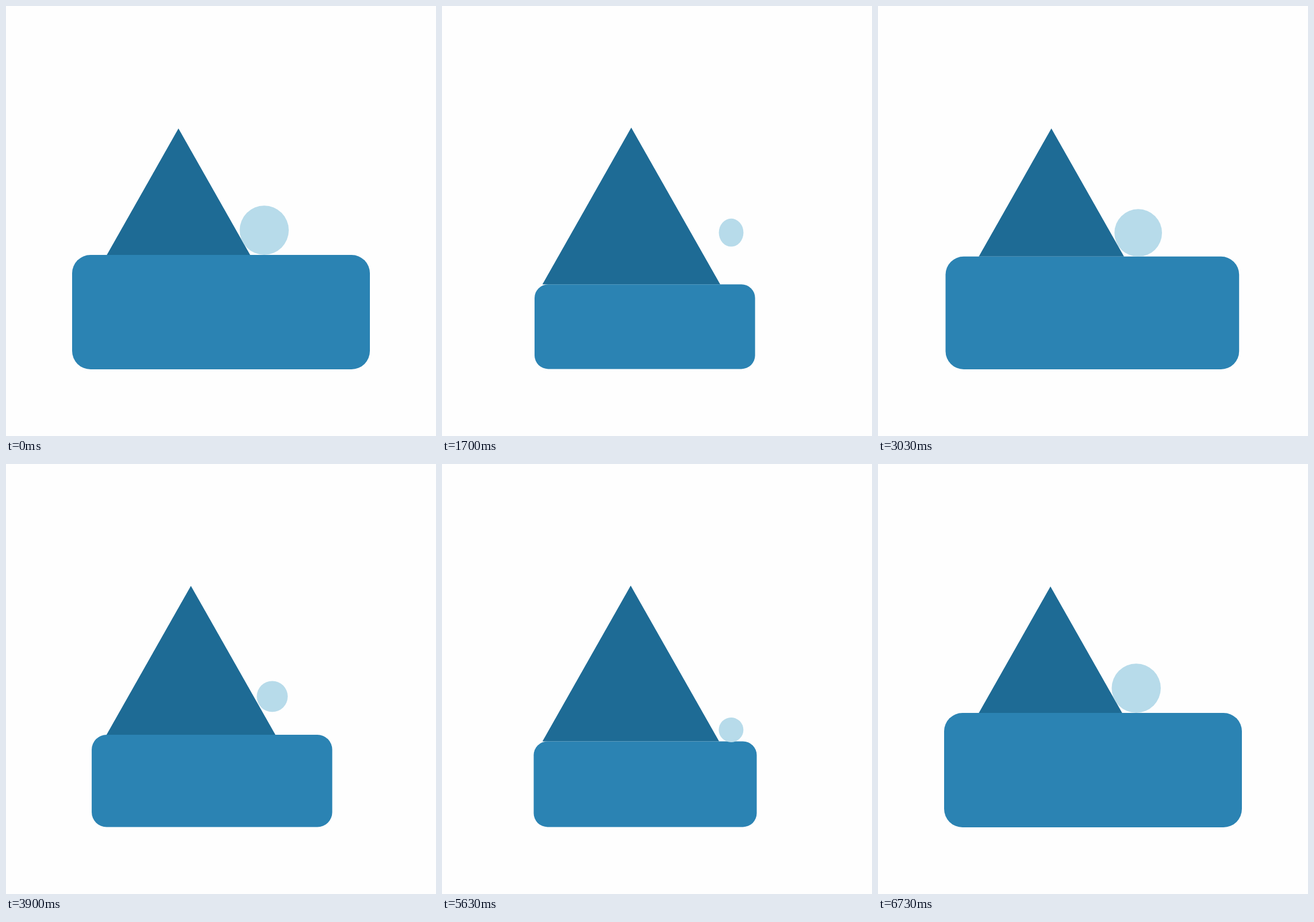
These frames come from a looping animation (748 by 748 pixels, 7.06 s). An HTML page:

```html
<!DOCTYPE html>
<html lang="en">
<head>
<meta charset="utf-8">
<title>Shapes</title>
<style>
  html, body { margin: 0; width: 100%; height: 100%; overflow: hidden; background: #fefefe; }
  svg { display: block; width: 100vw; height: 100vh; }
</style>
</head>
<body>
<svg viewBox="0 0 748 748">
  <path id="peak" fill="#1e6b95"/>
  <rect id="base" fill="#2b83b3"/>
  <ellipse id="ball" fill="#b7dbea"/>
</svg>
<script>
const LOOP = 7060, CYCLE = 3500;
const [peak, base, ball] = ['peak', 'base', 'ball'].map(id => document.getElementById(id));

const mix = (a, b, p) => a + (b - a) * p;
const ease = (t, from, to) => {
  const x = Math.min(1, Math.max(0, (t - from) / (to - from)));
  return x * x * (3 - 2 * x);
};
const set = (el, attrs) => {
  for (const name in attrs) el.setAttribute(name, attrs[name]);
};

// Two hops of equal length while the other shapes rest.
function hop(t) {
  if (t < 800 || t > 2000) return 0;
  const u = ((t - 800) % 600) / 600;
  return 4 * u * (1 - u);
}

function draw(t) {
  const p = ease(t, 0, 600) - ease(t, 2000, 3200);
  const top = mix(433, 484.2, p);
  const left = mix(115, 161, p);

  set(base, {
    x: left, y: top,
    width: mix(633, 544.6, p) - left,
    height: mix(632, 631.4, p) - top,
    rx: mix(32, 23.7, p)
  });

  const apex = `${mix(300, 329.2, p)} ${mix(213, 211.5, p)}`;
  set(peak, { d: `M${apex}L${mix(424.7, 484, p)} ${top}H${mix(175.4, 174.7, p)}Z` });

  // The ball shrinks with the base but travels later, sagging slightly on the way out.
  const back = ease(t, 2100, 3200);
  const out = ease(t, 200, 800);
  const r = mix(42.7, 21.4, ease(t, 0, 600) - back);
  const h = hop(t);
  set(ball, {
    cx: mix(449.2, 503, out - back),
    cy: mix(390, 462.6, Math.pow(out, 1.2) - back) - 68.4 * h,
    rx: r,
    ry: r * (1 + 0.14 * h)
  });
}

function tick(now) {
  const t = now % LOOP;
  // Uneven steps: one short and one long in every tenth of a second.
  const step = Math.floor(t / 100) * 100 + (t % 100 >= 30 ? 30 : 0);
  draw(step < 2 * CYCLE ? step % CYCLE : CYCLE);
  requestAnimationFrame(tick);
}
tick(performance.now());
</script>
</body>
</html>
```
